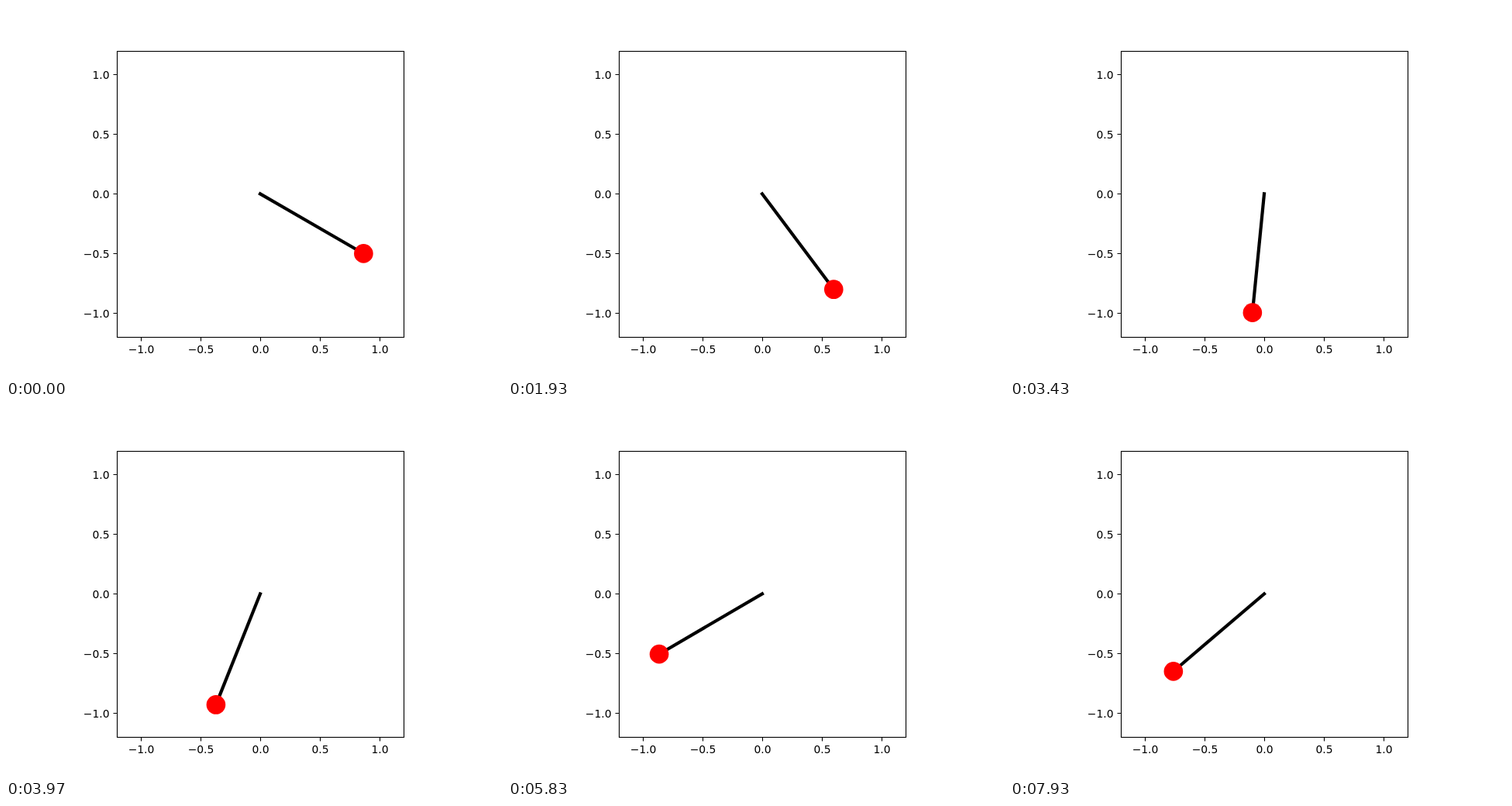
Recreate the animation shown at these times as an HTML page. Size 640x480 px, loop 7990 ms.

```html
<!DOCTYPE html>
<html lang="en">
<head>
<meta charset="utf-8">
<title>Pendulum</title>
<style>
  html, body { margin: 0; width: 100%; height: 100%; overflow: hidden; background: #fff; }
  svg { display: block; width: 640px; height: 480px; }
  text { font: 13.89px "DejaVu Sans", sans-serif; }
  .axes { fill: none; stroke: #000; stroke-width: 1.11; }
</style>
</head>
<body>
<svg viewBox="0 0 640 480">
  <rect class="axes" x="143.5" y="58.5" width="370" height="369"/>
  <g id="ticks"></g>
  <line id="rod" stroke="#000" stroke-width="4.17" stroke-linecap="square"/>
  <circle id="bob" r="12.32" fill="#f00"/>
</svg>
<script>
const LOOP = 7990, STEP = 60, FIRST_STEP = 130;
const PIVOT = { x: 328, y: 242.4 }, SCALE = 154;
const GRAVITY = 9.81, LENGTH = 1, DT = 0.01;
const rod = document.getElementById("rod");
const bob = document.getElementById("bob");

function setAttributes(element, attributes) {
  for (const [name, value] of Object.entries(attributes)) element.setAttribute(name, value);
}

function drawTicks() {
  let markup = "";
  for (const value of [-1, -0.5, 0, 0.5, 1]) {
    const label = value.toFixed(1).replace("-", "\u2212");
    const x = PIVOT.x + value * SCALE + 0.5;
    const y = Math.round(PIVOT.y - value * SCALE) + 0.5;
    markup += `<path class="axes" d="M${x} 427.5v5M143.5 ${y}h-5"/>
      <text x="${x}" y="448" text-anchor="middle">${label}</text>
      <text x="133.5" y="${y + 5.5}" text-anchor="end">${label}</text>`;
  }
  document.getElementById("ticks").innerHTML = markup;
}

// Explicit Euler integration; the swing gains a little energy at each step.
function simulate(count) {
  const angles = [];
  let angle = Math.PI / 3, velocity = 0;
  while (angles.length < count) {
    angles.push(angle);
    const acceleration = -GRAVITY / LENGTH * Math.sin(angle);
    angle += velocity * DT;
    velocity += acceleration * DT;
  }
  return angles;
}

function stepAt(time) {
  return time < FIRST_STEP ? 0 : Math.floor((time - FIRST_STEP) / STEP) + 2;
}

const angles = simulate(stepAt(LOOP) + 1);

function draw(time) {
  const angle = angles[stepAt(time % LOOP)];
  const x = PIVOT.x + SCALE * LENGTH * Math.sin(angle);
  const y = PIVOT.y + SCALE * LENGTH * Math.cos(angle);
  setAttributes(rod, { x1: PIVOT.x, y1: PIVOT.y, x2: x, y2: y });
  setAttributes(bob, { cx: x, cy: y });
}

drawTicks();
const start = performance.now();
function tick() {
  draw(performance.now() - start);
  requestAnimationFrame(tick);
}
tick();
</script>
</body>
</html>
```
